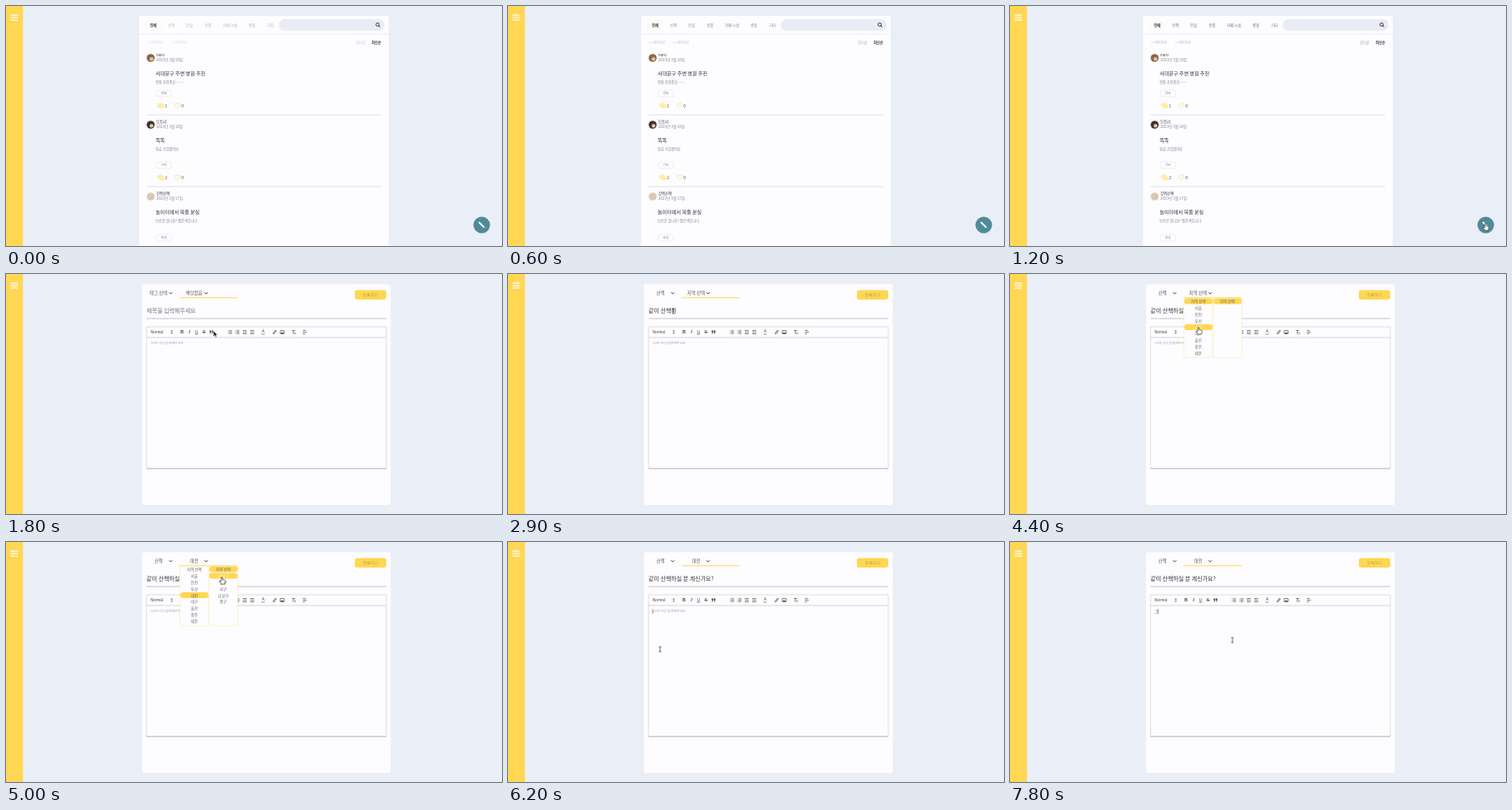
Animation, 600 px wide and 291 px high, one loop 8 s. Source, as an HTML page with a canvas:

```html
<!DOCTYPE html>
<html lang="ko">
<head>
<meta charset="utf-8">
<style>
  html, body { margin: 0; width: 100%; height: 100%; overflow: hidden; background: #eaeff7; }
  canvas { display: block; }
</style>
</head>
<body>
<canvas id="stage" width="600" height="291"></canvas>
<script>
const ctx = document.getElementById('stage').getContext('2d');
const LOOP = 8000, YELLOW = '#ffd753', CARD = '#fdfcfe', INK = '#33343a', GRAY = '#85868c';
const ROW = 7.9, FIRST_ROW = 33;
const TITLE = '같이 산책하실 분 계신가요?';
const TAGS = ['태그 선택', '산책', '분실', '용품', '카페/시설', '병원', '기타'];
const CITIES = ['지역 선택', '서울', '인천', '부산', '대전', '대구', '울산', '광주', '제주'];
const DISTRICTS = ['지역 선택', '대덕구', '동구', '서구', '유성구', '중구'];
const POSTS = [
  { y: 63, name: 'nuru', date: '2023년 3월 18일', title: '서대문구 주변 병원 추천', body: '병원 추천좀요~~~~', tag: '병원', tagY: 106, comments: 1, fur: '#8a6845' },
  { y: 144, name: '도토리', date: '2023년 3월 18일', title: '똑똑', body: '방금 가입했어요', tag: '기타', tagY: 193, comments: 2, fur: '#3b3432' },
  { y: 231, name: '강쥐산책', date: '2023년 3월 17일', title: '놀이터에서 목줄 분실', body: '보신분 있나요? 빨간색입니다.', tag: '분실', tagY: 281, comments: 0, fur: '#d5cdb8' }
];
// time, x, y, pointer shape
const POINTER = [
  [900, 540, 235, 'arrow'], [1100, 575, 264, 'hand'], [1500, 575, 264, 'arrow'], [1800, 251, 69, 'arrow'],
  [2050, 190, 24, 'hand'], [2150, 190, 24, 'hand'], [2350, 187, 41, 'hand'], [2550, 200, 45, 'beam'],
  [3300, 200, 45, 'beam'], [3500, 229, 24, 'hand'], [3750, 229, 24, 'hand'], [4400, 228, 65, 'hand'],
  [4550, 228, 65, 'hand'], [4850, 261, 43, 'hand'], [5250, 261, 43, 'arrow'], [5700, 184, 130, 'beam'],
  [6300, 184, 130, 'beam'], [6900, 269, 119, 'beam'], [LOOP, 269, 119, 'beam']
];

function text(s, x, y, size, color = INK, { weight = 400, align = 'left', style = '', family = '"Noto Sans CJK KR"' } = {}) {
  ctx.font = `${style} ${weight} ${size}px ${family}, sans-serif`;
  ctx.textAlign = align;
  ctx.textBaseline = 'middle';
  ctx.fillStyle = color;
  ctx.fillText(s, x, y);
  return ctx.measureText(s).width;
}
function box(x, y, w, h, r, fill, stroke, width = 0.6) {
  ctx.beginPath();
  ctx.roundRect(x, y, w, h, r);
  if (fill) { ctx.fillStyle = fill; ctx.fill(); }
  if (stroke) { ctx.strokeStyle = stroke; ctx.lineWidth = width; ctx.stroke(); }
}
function disc(x, y, r, fill) {
  ctx.beginPath();
  ctx.arc(x, y, r, 0, 7);
  ctx.fillStyle = fill;
  ctx.fill();
}
function path(d, x, y, stroke, width = 0.8, fill) {
  const p = new Path2D(d);
  ctx.save();
  ctx.translate(x, y);
  if (fill) { ctx.fillStyle = fill; ctx.fill(p); }
  if (stroke) { ctx.strokeStyle = stroke; ctx.lineWidth = width; ctx.stroke(p); }
  ctx.restore();
}
const rule = (x1, x2, y, color, width) => path(`M${x1} 0H${x2}`, 0, y, color, width);

// Every stage of composing Hangul text, jamo by jamo
const LEADS = 'ㄱㄲㄴㄷㄸㄹㅁㅂㅃㅅㅆㅇㅈㅉㅊㅋㅌㅍㅎ';
function keystrokes(s) {
  const stages = [''];
  [...s].forEach((ch, i) => {
    const code = ch.charCodeAt(0) - 0xac00, done = s.slice(0, i);
    if (code >= 0 && code < 11172) {
      stages.push(done + LEADS[Math.floor(code / 588)]);
      if (code % 28) stages.push(done + String.fromCharCode(0xac00 + code - code % 28));
    }
    stages.push(done + ch);
  });
  return stages;
}
const TITLE_KEYS = keystrokes(TITLE);
const BODY_KEYS = keystrokes('그');
function typed(keys, t, from, to) {
  const k = Math.floor((t - from) / (to - from) * (keys.length - 1)) + 1;
  return keys[Math.max(0, Math.min(keys.length - 1, k))];
}

function pointerAt(t) {
  if (t < POINTER[0][0]) return null;
  const i = POINTER.findIndex(p => p[0] > t);
  const [t0, x0, y0, kind] = POINTER[i - 1], [t1, x1, y1] = POINTER[i];
  const u = (t - t0) / (t1 - t0), e = u * u * (3 - 2 * u);
  return { x: x0 + (x1 - x0) * e, y: y0 + (y1 - y0) * e, kind };
}
function drawPointer({ x, y, kind }) {
  if (kind === 'beam') path('M-1.5-3H1.5M0-3V3M-1.5 3H1.5', x, y, '#444', 0.8);
  else if (kind === 'arrow') path('M0 0V7L1.7 5.5 2.8 8 4 7.5 2.9 5H5Z', x, y, '#fff', 0.5, '#222');
  else path('M-.8 0Q0-1 .8 0V2.6L3.6 3.2Q4.4 3.6 4.2 5L3.6 8H-.6L-3 4.6Q-2.6 3.6-.8 4.8Z', x, y, '#333', 0.7, '#fff');
}

function drawShell() {
  ctx.fillStyle = '#eaeff7';
  ctx.fillRect(0, 0, 600, 291);
  ctx.fillStyle = YELLOW;
  ctx.fillRect(0, 0, 20.5, 291);
  for (const y of [11, 14, 17]) rule(5.5, 14.5, y, '#fff', 1.3);
}

function drawPost({ y, name, date, title, body, tag, tagY, comments, fur }) {
  disc(175, y, 4.8, fur);
  disc(176, y + 1.3, 2.2, '#d9c6a4');
  text(name, 182, y - 3.5, 4.4, INK, { weight: 500 });
  text(date, 182, y + 2.5, 4.5, GRAY);
  text(title, 181, y + 18.3, 6.1, INK, { weight: 500 });
  text(body, 181, y + 29.5, 4.2, GRAY);
  box(181.5, tagY - 4, 19, 8, 3, CARD, '#e2e2e8');
  text(tag, 191, tagY, 3.8, GRAY, { align: 'center' });
  const iy = tagY + 15;
  box(183.5, iy - 3, 6, 4.5, 1.5, '#fff0a8', '#fbe58a');
  box(186, iy - 0.8, 5, 3.6, 1.3, '#fff0a8', '#fbe58a');
  text(comments, 192.3, iy, 5, '#55565c');
  path('M0 3C-5-.5-2.5-4.5 0-2C2.5-4.5 5-.5 0 3Z', 207.5, iy, '#f8df84', 0.8);
  text(0, 212.3, iy, 5, '#55565c');
}

function drawList(t) {
  box(161, 12, 302, 290, 3, CARD);
  ctx.globalAlpha = Math.min(1, 0.5 + t / 1800);
  ['산책', '분실', '용품', '카페/시설', '병원', '기타'].forEach((s, i) =>
    text(s, [200, 222, 244.5, 271, 297.5, 320][i], 23, 4.3, '#707178', { align: 'center' }));
  text('↩ 페이지로', 171, 44, 4, '#b5b6bc');
  text('↩ 페이지로', 200, 44, 4, '#b5b6bc');
  text('인기순', 429, 44, 4.2, '#96979d', { align: 'center' });
  ctx.globalAlpha = 1;
  box(169, 18, 18, 10, 4, null, '#fff3c8');
  text('전체', 178, 23, 4.4, INK, { weight: 700, align: 'center' });
  text('최신순', 448, 44, 4.2, INK, { weight: 700, align: 'center' });
  box(330, 16, 128, 14, 7, '#e9ecf4');
  path('M2 0A2 2 0 1 1-2 0A2 2 0 1 1 2 0M1.4 1.4L3.2 3.2', 449.5, 22.5, '#333', 1);
  rule(161, 463, 34, '#e6e7ec', 0.8);
  POSTS.forEach(drawPost);
  for (const y of [132, 219]) rule(170, 454, y, '#d9d9df', 0.8);
  disc(575.5, 266, 10.5, '#dbe2e8');
  disc(575.5, 265.5, 10, '#4f8b98');
  path('M-3.5-3.5L2.5 2.5', 575.5, 265.5, '#fff', 2);
  path('M2 3.4L3.8 3.8 3.4 2Z', 575.5, 265.5, null, 0, '#fff');
}

function drawToolbar() {
  const sans = { family: '"Liberation Sans"', align: 'center' }, c = '#444', y = 70.5;
  text('Normal', 175, y, 4.6, c, { family: '"Liberation Sans"', weight: 500 });
  path('M-1.3-.7L0-2.3 1.3-.7ZM-1.3.7L0 2.3 1.3.7Z', 200.5, y, null, 0, c);
  text('B', 213, y, 5.5, c, { ...sans, weight: 700 });
  text('I', 222, y, 5.5, c, { ...sans, style: 'italic', weight: 700 });
  text('U', 230.5, y - 0.3, 5, c, sans);
  rule(228.7, 232.3, 73, c, 0.7);
  text('S', 239.5, y, 5.3, c, sans);
  rule(237.3, 241.7, y, c, 0.6);
  path('M-2.2-2H-.3V0L-1.2 2H-2L-1.4 0H-2.2ZM.4-2H2.3V0L1.4 2H.6L1.2 0H.4Z', 248.5, y, null, 0, c);
  for (const x of [271, 280]) path('M-2.4-1.8h.8M-2.4 0h.8M-2.4 1.8h.8M-.9-1.8H2.3M-.9 0H2.3M-.9 1.8H2.3', x, y, c, 0.7);
  for (const x of [289, 298]) path('M-2.3-2H2.3M-.3 0H2.3M-2.3 2H2.3M-2.2-1L-.9 0-2.2 1', x, y, c, 0.7);
  text('A', 311, y - 0.5, 4.8, c, sans);
  rule(309, 313, 73, c, 0.6);
  path('M-.4-.4L-1.6.8Q-2.5 2-1.3 2Q-.5 2 .5.7M.4.4L1.6-.8Q2.5-2 1.3-2Q.5-2-.5-.7', 325, y, c, 0.9);
  box(331.8, 68.5, 4.6, 4, 0.4, null, c, 0.7);
  path('M-2 1.7L-.7 0 .3 .8 1 .2 2 1.7Z', 334.1, y, null, 0, c);
  path('M-2.2-2H1.5M0-2L-.9 2M.7.5L2.4 2.2M2.4.5L.7 2.2', 348, y, c, 0.7);
  path('M-2.3-2H1M-2.3 0H2.3M-2.3 2H.2', 361.5, y, c, 0.7);
}

function drawSelect(label, x, chevronX) {
  text(label, x, 23.3, 5.5, '#55565c', { align: 'center' });
  path('M-1.9-1L0 1 1.9-1', chevronX, 23.2, '#444', 1);
}

function drawMenu(items, x, selected, pointer, rows = items.length) {
  box(x, 29.2, 35, rows * ROW + 1, 1, CARD, '#fbe9a6');
  const inside = pointer && pointer.x > x && pointer.x < x + 35;
  const hovered = inside ? Math.round((pointer.y - FIRST_ROW) / ROW) : -1;
  items.forEach((item, i) => {
    const y = FIRST_ROW + i * ROW, hot = i === hovered && i !== selected;
    if (hot || i === selected) box(x + 0.5, y - 3.5, 34.5, 7, 3.5, YELLOW);
    text(item, x + 17.5, y + 0.2, 4.6, hot ? '#fff6cf' : '#66676c', { align: 'center' });
  });
}

function drawEditor(t, pointer) {
  box(164, 12, 302, 268.5, 3, CARD, '#e6e9f0');
  const tagged = t >= 2400, city = t >= 4500 ? 4 : 0;
  drawSelect(TAGS[tagged ? 1 : 0], 184.5, 199.3);
  drawSelect(tagged ? CITIES[city] : '해당없음', 227.5, 242.2);
  rule(210, 280, 28.8, YELLOW, 1);
  box(422, 19.5, 38, 11.5, 3, YELLOW);
  text('등록하기', 441, 25.2, 4.9, '#b89b45', { align: 'center' });

  const title = typed(TITLE_KEYS, t, 2600, 3300), blink = t % 1000 < 500;
  const titleWidth = title ? text(title, 170, 44.3, 7) : (text('제목을 입력해주세요', 170, 44.3, 7, '#77787d'), 0);
  if (t > 2550 && t < 3500 && blink) path('M0-3.5V3.5', 170.5 + titleWidth, 44.3, INK, 0.6);
  rule(170, 460, 54, '#c3c3c9', 1);

  box(170, 64, 290, 172, 0, null, '#cfcfd4', 0.7);
  rule(170, 460, 77, '#c9c9ce', 0.8);
  rule(170, 460, 235.8, '#bdbdc3', 1);
  drawToolbar();
  const body = typed(BODY_KEYS, t, 7600, 7700);
  let caretX = 175;
  if (body) caretX += text(body, 175, 84, 4.5);
  else text('10자 이상 입력해주세요', 175, 83.8, 4, '#a2a3a8', { style: 'italic' });
  if (t > 6000 && (body || t % 1000 < 600)) path('M0-2.8V2.8', caretX, 84, '#444', 0.6);

  if (t >= 2100 && t < 2400) drawMenu(TAGS, 167, 0, pointer);
  if (t >= 3550 && t < 5300) {
    drawMenu(CITIES, 210.3, city, pointer);
    drawMenu(city ? DISTRICTS : ['지역 선택'], 245.3, 0, pointer, CITIES.length);
  }
  if (t >= 3500 && t < 4400) {
    box(0, 287.3, 201, 5, 0, '#8d8d8d');
    text('페이지 불러오는 중', 1, 290, 4, '#d5d5d5');
  }
}

function frame(now) {
  const t = now % LOOP, pointer = pointerAt(t);
  drawShell();
  if (t < 1500) drawList(t);
  else drawEditor(t, pointer);
  if (pointer) drawPointer(pointer);
  requestAnimationFrame(frame);
}
requestAnimationFrame(frame);
</script>
</body>
</html>
```
